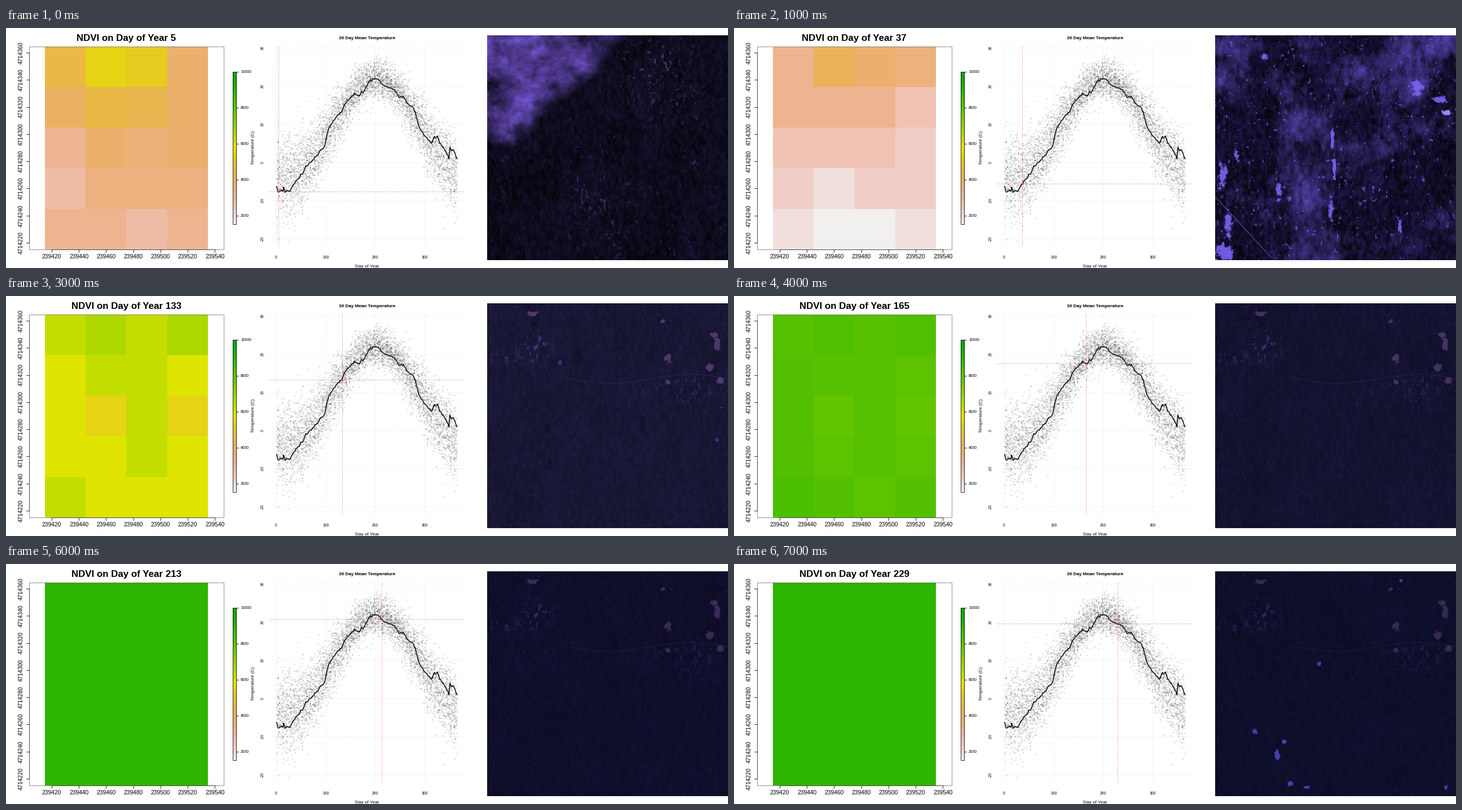
A matplotlib script for the animation above (8 s loop, 1280 by 427 pixels).

```python
import colorsys

import matplotlib.pyplot as plt
import numpy as np
from matplotlib.animation import FuncAnimation
from matplotlib.patches import Rectangle

DPI = 64  # a power of two keeps the pixel size exact
PX = 72 / DPI  # points per pixel
WIDTH, HEIGHT = 1280, 427
DAYS = [5, 37, 85, 133, 165, 197, 213, 229]

plt.rcParams["font.family"] = "Liberation Sans"
fig = plt.figure(figsize=(WIDTH / DPI, HEIGHT / DPI), dpi=DPI, facecolor="white")
ax = fig.add_axes([0, 0, 1, 1])
ax.axis("off")


def text(x, y, s, size, **kw):
    style = dict(ha="center", va="baseline", color="black")
    style.update(kw)
    return ax.text(x, y, s, fontsize=size * PX, **style)


def side_text(x, y, s, size):
    return text(x, y, s, size, rotation=90, va="center")


def line(xs, ys, color="black", width=0.8, **kw):
    return ax.plot(xs, ys, color=color, lw=width * PX, **kw)[0]


def picture(data, left, right, top, bottom):
    return ax.imshow(data, extent=(left, right, bottom, top), aspect="auto",
                     interpolation="nearest", zorder=1)


# ---- vegetation raster -------------------------------------------------

def terrain(q):
    """White (0) over orange to yellow (1), then to dark green (2)."""
    if q <= 1:
        return colorsys.hsv_to_rgb(q / 6, q, 0.95 - 0.05 * q)
    return colorsys.hsv_to_rgb(q / 6, 1, 0.9 - 0.25 * (q - 1))


def tint(levels):
    return np.array([[terrain(q) for q in row] for row in levels])


JANUARY = np.array([[.70, .91, .86, .54], [.59, .70, .66, .54], [.38, .54, .49, .53],
                    [.31, .46, .46, .46], [.39, .39, .31, .39]])
FEBRUARY = np.array([[.39, .61, .53, .46], [.39, .39, .39, .25], [.25, .25, .25, .17],
                     [.17, .08, .17, .17], [.08, .01, .01, .08]])
MARCH = np.array([[.46, .53, .39, .25], [.32, .39, .25, .17], [.25, .25, .08, .17],
                  [.25, .32, .39, .17], [.25, .17, .25, .17]])
MAY = np.array([[1.12, 1.20, 1.12, 1.20], [1.02, 1.12, 1.12, 1.02], [1.02, .91, 1.12, .91],
                [1.02, 1.02, 1.12, 1.02], [1.12, 1.02, 1.02, 1.02]])
SUMMER = np.full((5, 4), 1.75)
JULY = SUMMER.copy()
JULY[1:, 0] = JULY[4, 1] = JULY[4, 3] = 1.81
JUNE = 0.3 * MAY + 0.7 * JULY
RASTERS = [tint(m) for m in (JANUARY, FEBRUARY, MARCH, MAY, JUNE, JULY, SUMMER, SUMMER)]

raster = picture(RASTERS[0], 69, 358, 33, 394)
title = text(213, 23, "", 16.85, weight="bold")
ax.add_patch(Rectangle((40.5, 33), 345.5, 361, fill=False, ec="#777777", lw=0.8 * PX, zorder=2))

for k in range(7):
    x = 81 + 48.2 * k
    line([x, x], [394, 398.5])
    text(x, 410, str(239420 + 20 * k), 10.2)
for k in range(8):
    y = 382 - 48.3 * k
    line([36, 40.5], [y, y])
    side_text(27, y, str(4714220 + 20 * k), 10.2)
line([81, 370.2], [394.3, 394.3], "#333333")
line([40.5, 40.5], [382, 44], "#333333")

# colour key
picture(tint(np.linspace(2, 0, 255)[:, None]), 401.5, 408, 78, 349)
ax.add_patch(Rectangle((401.5, 77.5), 6.5, 271.5, fill=False, ec="black", lw=0.8 * PX, zorder=2))
for value in range(2000, 10001, 2000):
    y = 78 + (10000 - value) * 0.03194
    line([408, 412], [y, y])
    text(416, y + 2.5, str(value), 6.8, ha="left")


# ---- temperature chart -------------------------------------------------

def day_x(day):
    return 479 + 0.8767 * np.asarray(day)


def temp_y(temp):
    return 239 - 6.8 * np.asarray(temp)


DOTTED = (0, (1, 2.6))
for t in range(-20, 31, 10):
    line([467, 813], [temp_y(t)] * 2, "#d3d3d3", ls=DOTTED, zorder=1)
    side_text(455, temp_y(t), str(t), 6.8)
for d in range(0, 301, 100):
    line([day_x(d)] * 2, [33, 389], "#d3d3d3", ls=DOTTED, zorder=1)
    text(day_x(d), 409.5, str(d), 6.8)
text(640, 19.5, "30 Day Mean Temperature", 8.1, weight="bold")
text(640, 426, "Day of Year", 8.3)
side_text(438.5, 213, "Temperature (C)", 8.3)

rng = np.random.default_rng(4)
days = np.tile(np.arange(1, 366), 14)
season = np.cos(2 * np.pi * (days - 20) / 365)
temps = 9 - 12.8 * season + (3.9 + 1.4 * season) * rng.normal(size=days.size)
keep = (temps > -21) & (temps < 28.5)
ax.scatter(day_x(days[keep]), temp_y(temps[keep]), s=(2.24 * PX) ** 2, color="black",
           alpha=0.17, linewidths=0, zorder=2)

MEAN_TEMP = np.array([
    (1, -6.3), (3, -7.5), (6, -7.8), (10, -7.2), (14, -7.6), (15, -6.5), (18, -7.7),
    (24, -7.4), (28, -7.6), (33, -6.2), (37, -5.6), (40, -4.8), (46, -4.2), (50, -3.2),
    (54, -3), (60, -.9), (64, -.9), (67, -.1), (72, .2), (78, 1.3), (85, 2.05), (90, 3.4),
    (94, 3.4), (98, 4.3), (104, 8), (108, 9.4), (118, 11.2), (124, 12.3), (133, 13.3),
    (138, 15), (143, 16), (153, 17.2), (158, 18), (168, 17.3), (172, 18.4), (176, 18.3),
    (190, 21.6), (193, 21.4), (197, 21.9), (206, 21.8), (217, 20.1), (229, 19.5),
    (235, 19.3), (242, 18.5), (248, 17), (257, 17.2), (266, 15.3), (278, 14.2),
    (283, 12.2), (287, 10), (290, 9), (300, 7), (314, 5), (320, 6.8), (323, 6.3),
    (326, 6.9), (331, 5), (336, 4.2), (343, 2.9), (349.5, 1), (351, 4), (354, 3),
    (358, 3.4), (363, 1.8), (366, .9)])


def mean_temp(day):
    return np.interp(day, MEAN_TEMP[:, 0], MEAN_TEMP[:, 1])


curve_days = np.arange(1, 366.5, 0.5)
wiggle = 0.15 * np.sin(curve_days * 1.1) * np.sin(curve_days * 0.23)
line(day_x(curve_days), temp_y(mean_temp(curve_days) + wiggle), width=1.5, zorder=3)

RED = "#ff2020"
across = line([467, 813], [0, 0], RED, 0.9, ls=DOTTED, zorder=4)
down = line([0, 0], [33, 389], RED, 0.9, ls=DOTTED, zorder=4)
marker = line([0], [0], RED, marker="o", ms=3 * PX, mew=0, zorder=5)

# ---- aerial view -------------------------------------------------------

VIEW_W, VIEW_H = 427, 400
X, Y = np.meshgrid(853 + np.arange(VIEW_W), 13 + np.arange(VIEW_H))


def noise(seed, cell_x, cell_y=None, octaves=3):
    """Layered value noise with zero mean and unit deviation."""
    gen = np.random.default_rng(seed)
    out = np.zeros((VIEW_H, VIEW_W))
    for k in range(octaves):
        sx = cell_x / 2 ** k
        sy = (cell_y or cell_x) / 2 ** k
        grid = gen.random((int(VIEW_H / sy) + 3, int(VIEW_W / sx) + 3))
        i, fy = np.divmod(np.arange(VIEW_H) / sy, 1)
        j, fx = np.divmod(np.arange(VIEW_W) / sx, 1)
        i, j = i.astype(int), j.astype(int)
        fy = (fy * fy * (3 - 2 * fy))[:, None]
        fx = fx * fx * (3 - 2 * fx)
        rows = grid[i] * (1 - fy) + grid[i + 1] * fy
        out += 0.62 ** k * (rows[:, j] * (1 - fx) + rows[:, j + 1] * fx)
    return (out - out.mean()) / out.std()


def ramp(v):
    return np.clip(v, 0, 1)


def blend(img, color, mask):
    img += mask[..., None] * (np.array(color) - img)


def ground(color, seed, grain):
    shade = 1 + grain * (noise(seed, 5, 9) + 0.5 * noise(seed + 1, 40, 90))
    return np.array(color, float) * shade[..., None]


def glow(x, y, rx, ry):
    return np.exp(-((X - x) / rx) ** 2 - ((Y - y) / ry) ** 2)


EDGE = 0.28 * noise(90, 7)


def patches(img, color, spots, strength=1.0):
    """Ragged flat patches given as (x, y, half width, half height)."""
    for x, y, rx, ry in spots:
        d = np.hypot((X - x) / rx, (Y - y) / ry) + EDGE
        blend(img, color, strength * ramp((1.1 - d) * 2.5))


def specks(img, color, seed, level, area=1.0, strength=0.7):
    blend(img, color, strength * area * ramp((noise(seed, 4, 6, 2) - level) * 1.5))


def cloud_edge():
    img = ground((13, 12, 29), 10, 0.22)
    specks(img, (66, 48, 118), 11, 1.4, ramp(0.35 + 0.3 * noise(12, 40, 110)))
    specks(img, (110, 72, 125), 13, 1.2, glow(1145, 75, 60, 70))
    specks(img, (95, 65, 130), 14, 0.7, glow(1040, 313, 30, 18))
    soft = noise(15, 60, octaves=5)
    fine = noise(16, 14, 10)
    slope = 1108 - 1.03 * (Y - 13) - X + 9 * soft
    mask = ramp(slope / 55) * ramp((208 - Y + 5 * soft) / 25)
    shade = 0.72 + 0.16 * soft + 0.07 * fine - 0.4 * glow(868, 95, 35, 28)
    shade += 0.4 * glow(910, 202, 16, 12) + 0.3 * glow(880, 198, 14, 8)
    cloud = np.array((98, 72, 178)) * np.clip(shade, 0.2, 1.5)[..., None]
    img += mask[..., None] * (cloud - img)
    return img


def thin_cloud():
    img = ground((17, 14, 42), 20, 0.25)
    veil = 0.2 * noise(21, 80, octaves=6) + 0.08 * noise(22, 8, 14)
    for x, y, rx, ry in [(885, 30, 40, 28), (985, 140, 38, 50), (1148, 218, 42, 42),
                         (1010, 295, 40, 40), (1212, 105, 26, 30), (1268, 350, 45, 50),
                         (1115, 80, 35, 25), (1200, 30, 40, 25)]:
        veil += 0.42 * glow(x, y, rx, ry)
    blend(img, (108, 84, 214), ramp(veil) * 0.85)
    specks(img, (122, 98, 240), 23, 1.7)
    patches(img, (122, 100, 245), [(866, 262, 7, 26), (875, 350, 6, 20), (868, 400, 16, 15),
                                   (890, 225, 5, 10), (1058, 322, 6, 16), (1064, 255, 3, 25),
                                   (1060, 195, 3, 18), (1252, 128, 10, 5), (1210, 105, 10, 12),
                                   (965, 290, 5, 14), (1180, 350, 4, 10), (940, 50, 7, 6)], 0.9)
    patches(img, (165, 125, 250), [(1262, 150, 7, 4)])
    track = np.abs(Y - 300 - 1.09 * (X - 853))
    blend(img, (100, 80, 190), 0.7 * ramp(1.6 - track) * (X < 952))
    return img


def frozen_lakes():
    img = ground((23, 17, 45), 30, 0.2)
    specks(img, (58, 40, 90), 31, 1.3, ramp(0.5 + 0.3 * noise(32, 50, 100)))
    specks(img, (140, 100, 210), 33, 2.5)
    patches(img, (126, 102, 240), [
        (939, 50, 6, 8), (980, 126, 4, 11), (1030, 80, 2.5, 7), (1208, 64, 4, 2.5),
        (1022, 150, 9, 3), (1057, 153, 6, 2.5), (887, 213, 4, 10), (889, 184, 5, 5),
        (865, 186, 4, 7), (867, 255, 4, 11), (958, 236, 5, 6), (964, 296, 3.5, 9),
        (984, 200, 2.5, 8), (1152, 220, 3.5, 7), (1173, 184, 2.5, 10), (1246, 210, 4, 7),
        (1180, 346, 3, 11), (864, 405, 15, 12), (876, 385, 5, 14), (1135, 381, 4, 2.5),
        (1198, 15, 6, 2)])
    patches(img, (200, 150, 250), [(1127, 229, 5, 19), (1108, 285, 7, 4)])
    return img


FIELDS = [(932, 30, 9, 4), (1175, 112, 6, 9), (1173, 152, 5, 5), (1254, 68, 6, 5),
          (1260, 86, 5, 8), (1248, 128, 6, 6), (1266, 150, 7, 5), (1164, 44, 4, 3)]
LAKES = [(936, 50, 8, 7), (1128, 226, 5, 17), (959, 236, 5, 8), (964, 296, 4, 9)]


def clear_land(base, seed, light, spots=(), bright=(95, 88, 225)):
    img = ground(base, seed, 0.06)
    specks(img, (60, 50, 100), 41, 1.9, strength=0.35 * light)
    town = glow(938, 90, 28, 26) + 0.7 * glow(875, 110, 30, 12) + 0.5 * glow(1210, 165, 60, 30)
    specks(img, (80, 65, 165), 42, 0.8, ramp(town), 0.75 * light)
    road = np.abs(Y - 147 - 8 * np.sin((X - 1000) / 45))
    blend(img, (58, 50, 92), 0.3 * light * ramp(1.5 - road) * (X > 985))
    patches(img, (10, 10, 28), LAKES, 0.5 * light)
    patches(img, (112, 74, 140), FIELDS, 0.65 * light)
    patches(img, bright, spots, 0.85)
    return img


def july():
    img = clear_land((15, 16, 44), 50, 0.75, [
        (1194, 82, 8, 9), (1165, 69, 6, 7), (1273, 107, 6, 5), (1203, 259, 4, 4),
        (906, 119, 3, 2.5), (994, 123, 3, 2), (1181, 30, 3, 4), (1256, 202, 3, 3),
        (1178, 155, 4, 3)])
    patches(img, (190, 175, 255), [(1194, 82, 5, 6)])
    return img


VIEWS = [
    cloud_edge(),
    thin_cloud(),
    frozen_lakes(),
    clear_land((24, 23, 52), 40, 1.0, [(982, 117, 3, 4), (1260, 255, 4, 3), (1268, 198, 3, 3)],
               (66, 55, 145)),
    clear_land((19, 19, 48), 45, 0.85),
    july(),
    clear_land((15, 15, 43), 55, 0.7),
    clear_land((14, 15, 42), 60, 0.65, [
        (923, 298, 6, 5), (963, 340, 4, 8), (985, 390, 4, 4), (1013, 396, 6, 3),
        (1262, 397, 4, 4), (1037, 178, 3, 3), (1181, 30, 3, 3), (975, 316, 3, 3)],
        (78, 72, 195)),
]
VIEWS = [np.clip(v, 0, 255).astype(np.uint8) for v in VIEWS]
view = picture(VIEWS[0], 853, 1280, 13, 413)

ax.set_xlim(0, WIDTH)
ax.set_ylim(HEIGHT, 0)


def update(i):
    day = DAYS[i]
    x, y = day_x(day), temp_y(mean_temp(day))
    title.set_text(f"NDVI on Day of Year {day}")
    raster.set_data(RASTERS[i])
    view.set_data(VIEWS[i])
    across.set_ydata([y, y])
    down.set_xdata([x, x])
    marker.set_data([x], [y])
    return title, raster, view, across, down, marker


anim = FuncAnimation(fig, update, frames=len(DAYS), interval=1000, repeat=True, repeat_delay=0)
plt.show()
```
